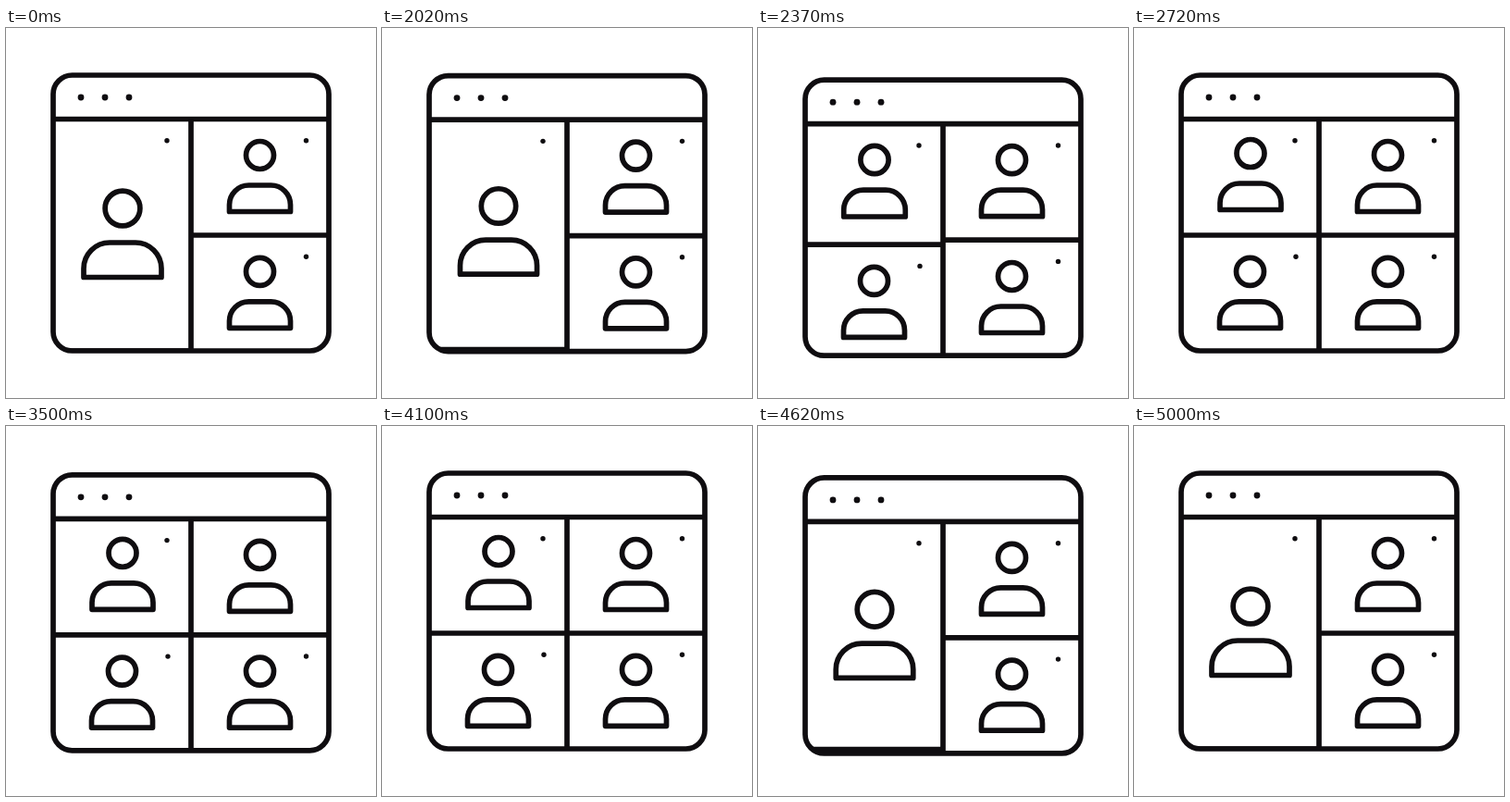
An HTML page with a canvas for the animation above (5.02 s loop, 400 by 400 pixels).

```html
<!DOCTYPE html>
<html lang="en">
<head>
<meta charset="utf-8">
<title>Video call layout</title>
<style>
  html, body { margin: 0; width: 100%; height: 100%; overflow: hidden; background: #fff; }
  canvas { display: block; width: 400px; height: 400px; }
</style>
</head>
<body>
<canvas id="stage" width="400" height="400"></canvas>
<script>
const ctx = document.getElementById('stage').getContext('2d');
const LOOP = 5020, SPLIT = 1988, MERGE = 4230, MOVE = 510;
const INK = '#0f0d10';

const lerp = (a, b, k) => a + (b - a) * k;
const clamp = v => Math.min(1, Math.max(0, v));

// Cubic bezier easing with control points (x1, 0) and (x2, 1)
const ease = (x1, x2) => x => {
  x = clamp(x);
  let lo = 0, hi = 1;
  for (let i = 0; i < 24; i++) {
    const s = (lo + hi) / 2, r = 1 - s;
    if (3 * x1 * s * r * r + 3 * x2 * s * s * r + s * s * s < x) lo = s; else hi = s;
  }
  return lo * lo * (3 - 2 * lo);
};
const easeDivider = ease(.33, .2);
const easePerson = ease(.18, .125);
const easeRise = ease(.4, .67);
const easeFall = ease(.2, .12);

const bounce = (t, start, rise, fall, height) =>
  height * (easeRise((t - start) / rise) - easeFall((t - start - rise) / fall));

// 0 = one large caller on the left, 1 = two small ones
const splitAmount = (t, easing) =>
  easing((t - SPLIT) / MOVE) - easing((t - MERGE) / MOVE);

// Two short blinks, the second starting at the given time
const blinking = (t, second) =>
  [second - 455, second].some(s => t >= s && t < s + 172);

function line(x1, y1, x2, y2) {
  ctx.beginPath();
  ctx.moveTo(x1, y1);
  ctx.lineTo(x2, y2);
  ctx.stroke();
}

function dot(x, y, r) {
  ctx.beginPath();
  ctx.arc(x, y, r, 0, 7);
  ctx.fill();
}

function windowShape() {
  ctx.beginPath();
  ctx.roundRect(51, 51, 298, 298, 20.5);
}

function person(x, y, size = 0) {
  const half = lerp(33, 42, size), radius = lerp(21, 28, size);
  const top = y + lerp(32.5, 37, size), bottom = y + lerp(61, 74.5, size);
  ctx.beginPath();
  ctx.arc(x, y, lerp(15, 18.9, size), 0, 7);
  ctx.moveTo(x - half, bottom);
  ctx.arcTo(x - half, top, x, top, radius);
  ctx.arcTo(x + half, top, x + half, bottom, radius);
  ctx.lineTo(x + half, bottom);
  ctx.closePath();
  ctx.stroke();
}

function draw(t) {
  const lift = bounce(t, SPLIT, 225, 540, 12.8)
    + bounce(t, 3325, 85, 400, 3.3)
    + bounce(t, MERGE, 225, 540, 12.8);
  const shift = 125 * (1 - splitAmount(t, easeDivider));
  const size = 1 - splitAmount(t, easePerson);

  ctx.clearRect(0, 0, 400, 400);
  ctx.save();
  ctx.translate(0, lift);
  ctx.strokeStyle = ctx.fillStyle = INK;
  ctx.lineWidth = 5.7;
  ctx.lineJoin = 'round';

  ctx.save();
  windowShape();
  ctx.clip();
  line(51, 98.5, 349, 98.5);
  line(200, 98.5, 200, 349);
  line(200, 224, 349, 224);
  line(51, 224 + shift, 200, 224 + shift);
  person(126, lerp(135.5, 195, size), size);
  person(125.5, 263.3 + shift);
  person(274.5, 137.5);
  person(274.5, 263.3);
  if (!blinking(t, 4825)) dot(174, 121.8, 2.7);
  if (!blinking(t, 3922)) dot(324.5, 121.8, 2.7);
  if (!blinking(t, 2940)) dot(175, 247.3 + shift, 2.7);
  dot(324.5, 247.2, 2.7);
  ctx.restore();

  windowShape();
  ctx.stroke();
  for (const x of [81, 107, 133]) dot(x, 75, 3.4);
  ctx.restore();
}

const start = performance.now();
function tick() {
  draw((performance.now() - start) % LOOP);
  requestAnimationFrame(tick);
}
tick();
</script>
</body>
</html>
```
